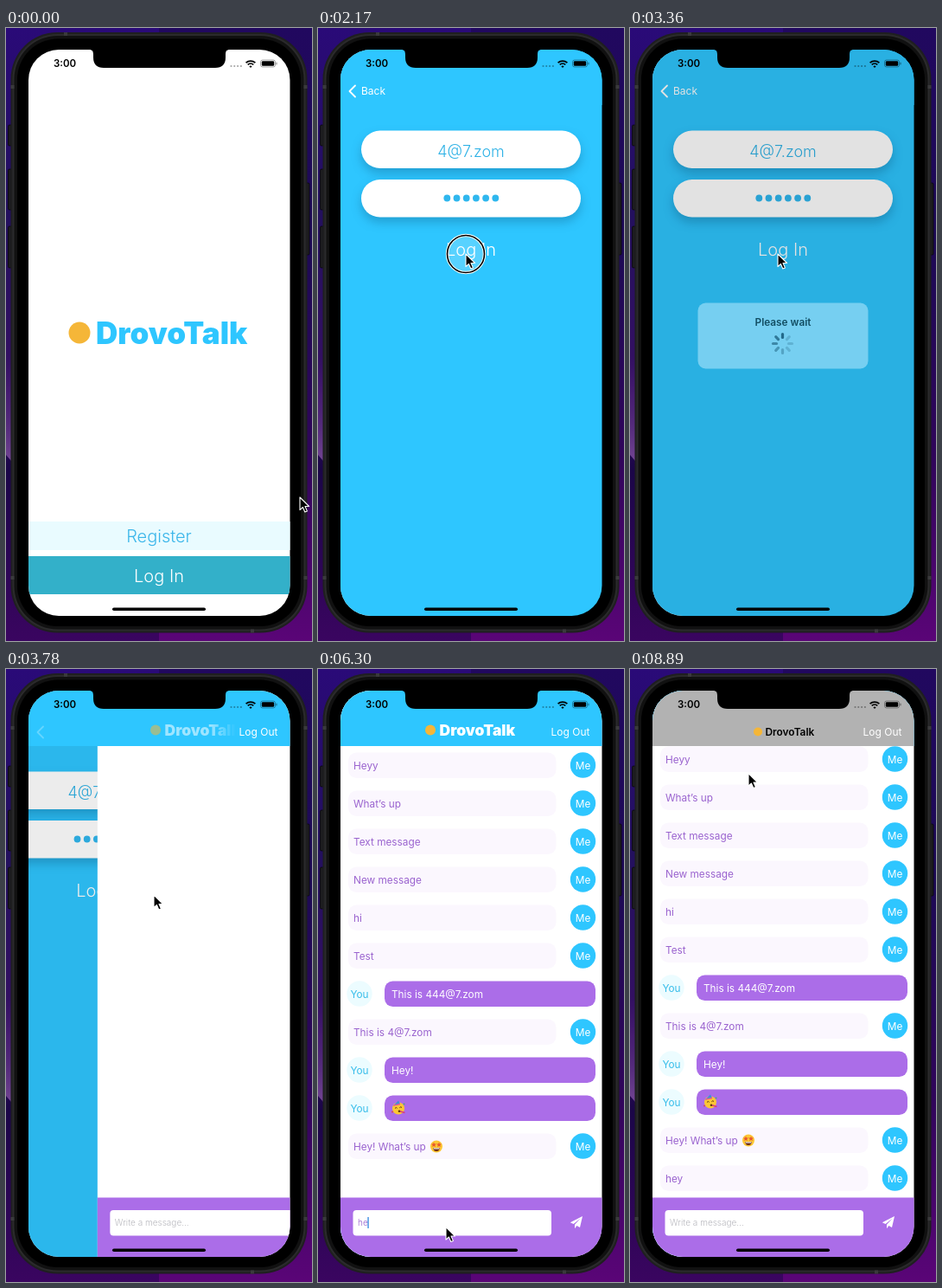
Write an HTML page that moves like this. It is 354x708 px and loops after 9100 ms.

```html
<!DOCTYPE html>
<html lang="en">
<head>
<meta charset="utf-8">
<title>Chat app demo</title>
<style>
  html, body { margin: 0; width: 100%; height: 100%; overflow: hidden; background: #16073f; }
  svg { display: block; width: 100vw; height: 100vh; font-family: Inter, Roboto, sans-serif; }
  .mid { text-anchor: middle; }
  .card { filter: drop-shadow(0 6px 6px rgba(0, 50, 85, .26)); }
</style>
</head>
<body>
<svg viewBox="0 0 354 708" xmlns="http://www.w3.org/2000/svg">
  <defs>
    <linearGradient id="wall" x1="0" y1="0" x2="0" y2="1">
      <stop offset="0" stop-color="#2a0a78"/>
      <stop offset=".3" stop-color="#23105e"/>
      <stop offset=".6" stop-color="#371063"/>
      <stop offset=".72" stop-color="#1b0648"/>
      <stop offset="1" stop-color="#3a0560"/>
    </linearGradient>
    <linearGradient id="wallRight" x1="0" y1="0" x2="0" y2="1">
      <stop offset="0" stop-color="#21085f"/>
      <stop offset=".35" stop-color="#1d0a55"/>
      <stop offset=".7" stop-color="#30055a"/>
      <stop offset="1" stop-color="#5a0577"/>
    </linearGradient>
    <linearGradient id="glow" x1="0" y1="0" x2="0" y2="1">
      <stop offset="0" stop-color="#5a2a88" stop-opacity="0"/>
      <stop offset="1" stop-color="#7a4a98"/>
    </linearGradient>
    <linearGradient id="edgeFade" gradientUnits="userSpaceOnUse" x1="236" y1="0" x2="266" y2="0">
      <stop offset="0" stop-color="#fff"/>
      <stop offset="1" stop-color="#000"/>
    </linearGradient>
    <mask id="titleMask" maskUnits="userSpaceOnUse" x="26" y="25" width="303" height="64">
      <rect x="26" y="25" width="303" height="64" fill="url(#edgeFade)"/>
    </mask>
    <clipPath id="screen"><rect x="26" y="25" width="302.5" height="654" rx="35"/></clipPath>
    <clipPath id="tableClip"><rect x="26" y="89" width="303" height="521"/></clipPath>
  </defs>

  <rect width="354" height="708" fill="url(#wall)"/>
  <rect x="177" width="177" height="708" fill="url(#wallRight)"/>
  <path d="M0 380H12V507L0 493Z" fill="url(#glow)"/>

  <g fill="#1d1d1f" stroke="#000" stroke-width=".6">
    <rect x="2.5" y="112" width="6" height="24" rx="1.5"/>
    <rect x="2.5" y="163" width="6" height="47" rx="1.5"/>
    <rect x="2.5" y="229" width="6" height="48" rx="1.5"/>
    <rect x="345" y="179" width="6" height="83" rx="1.5"/>
  </g>
  <rect x="5.5" y="5" width="343" height="693.5" rx="54" fill="#1f1f20"/>
  <rect x="7.5" y="7" width="339" height="689.5" rx="52" fill="#2b2b2c"/>
  <rect x="9.5" y="9" width="335" height="685.5" rx="50" fill="#111"/>
  <rect x="13" y="12.5" width="328" height="678.5" rx="47" fill="#000"/>
  <g fill="#3a3a3c">
    <rect x="5.5" y="66" width="4" height="4"/><rect x="344.5" y="66" width="4" height="4"/>
    <rect x="5.5" y="633" width="4" height="4"/><rect x="344.5" y="633" width="4" height="4"/>
    <rect x="67" y="5" width="4" height="4"/><rect x="283" y="694.5" width="4" height="4"/>
  </g>

  <g clip-path="url(#screen)">
    <g id="welcome">
      <rect x="26" y="25" width="303" height="654" fill="#fff"/>
      <circle cx="85" cy="352" r="12.5" fill="#f5b638"/>
      <text x="104" y="365" font-size="35" font-weight="900" fill="#2ec6ff">DrovoTalk</text>
      <rect x="26" y="570" width="303" height="33" fill="#e9fbff"/>
      <text class="mid" x="177" y="594" font-size="20" font-weight="300" fill="#3bb6ea">Register</text>
      <rect x="26" y="610" width="303" height="44" fill="#33b0c9"/>
      <text class="mid" x="177" y="640" font-size="20" font-weight="300" fill="#fff">Log In</text>
    </g>
    <rect id="welcomeDim" x="26" y="25" width="303" height="654"/>

    <g id="login">
      <rect x="26" y="25" width="303" height="654" fill="#2ec6ff"/>
      <rect class="card" x="50" y="118.5" width="254" height="43.5" rx="21.7" fill="#fff"/>
      <rect class="card" x="50" y="175" width="254" height="43.5" rx="21.7" fill="#fff"/>
      <text class="mid" x="177" y="149" font-size="18" font-weight="300" fill="#2fb2e6">4@7.zom</text>
      <g id="secret" fill="#2fb7ee"></g>
      <text class="mid" x="177" y="263" font-size="20" font-weight="300" fill="#fff">Log In</text>
    </g>
    <rect id="loginDim" x="26" y="25" width="303" height="654"/>

    <g id="chat">
      <rect x="26" y="25" width="303" height="654" fill="#fff"/>
      <g clip-path="url(#tableClip)"><g id="rows" font-size="11.8" font-weight="400"></g></g>
      <rect x="26" y="610.5" width="303" height="69" fill="#ab6de8"/>
      <rect x="40.5" y="625" width="229.5" height="29.5" rx="4" fill="#fff"/>
      <text id="field" x="46" y="643" font-size="10" font-weight="300"></text>
      <rect id="caret" y="633" width="1.3" height="13" fill="#2f86e0"/>
      <path d="M306 632 291.8 639.2 295.6 641 303.6 634.6 297 641.8V646.2L299.4 643 303 645Z" fill="#fff"/>
    </g>

    <g id="nav">
      <rect x="26" y="25" width="303" height="64" fill="#2ec6ff"/>
      <rect id="navGray" x="26" y="25" width="303" height="64" fill="#b2b2b2"/>
      <path id="chevron" d="M43 66.5 36.5 73 43 79.5" fill="none" stroke="#fff" stroke-width="1.8" stroke-linecap="round" stroke-linejoin="round"/>
      <text id="back" x="50" y="77" font-size="12" fill="#fff">Back</text>
      <g mask="url(#titleMask)">
        <g id="title">
          <circle cx="130" cy="70.5" r="6" fill="#f5b638"/>
          <text x="140.5" y="77" font-size="17.5" font-weight="900" fill="#fff">DrovoTalk</text>
        </g>
      </g>
      <g id="smallTitle">
        <circle cx="148" cy="72.5" r="5" fill="#f5b638"/>
        <text x="156.5" y="77" font-size="11.9" font-weight="600">DrovoTalk</text>
      </g>
      <text id="logout" x="269.5" y="77" font-size="12" fill="#fff">Log Out</text>
    </g>

    <text x="55" y="45" font-size="11.5" font-weight="600">3:00</text>
    <g fill="#000" fill-opacity=".35">
      <circle cx="260.5" cy="44" r="1.1"/><circle cx="264.3" cy="44" r="1.1"/>
      <circle cx="268.1" cy="44" r="1.1"/><circle cx="271.9" cy="44" r="1.1"/>
    </g>
    <g fill="none" stroke="#000" stroke-width="1.7">
      <path d="M277.6 40.2A7.8 7.8 0 0 1 288.4 40.2M279.7 42.4A4.8 4.8 0 0 1 286.3 42.4"/>
      <path d="M283 46 281.4 44.3A2.3 2.3 0 0 1 284.6 44.3Z" fill="#000" stroke="none"/>
      <rect x="294.5" y="37" width="17" height="8" rx="2.3" stroke-width=".8" stroke-opacity=".45"/>
      <rect x="295.8" y="38.2" width="14.4" height="5.6" rx="1.3" fill="#000" stroke="none"/>
      <path d="M313 39.7V42.4" stroke-width="1" stroke-opacity=".5"/>
    </g>

    <rect id="alertDim" x="26" y="25" width="303" height="654"/>
    <g id="alert">
      <rect x="78.5" y="317.5" width="197" height="76" rx="9" fill="#b3e8fd"/>
      <text class="mid" x="177" y="344" font-size="11.8" font-weight="600">Please wait</text>
      <g id="spinner" stroke="#123" stroke-width="3.2" stroke-linecap="round"></g>
    </g>
    <path d="M96 25C100 25 101 27 101 31V34Q101 46 113 46H242Q254 46 254 34V31C254 27 255 25 259 25V20H96Z"/>
    <rect x="123" y="669.5" width="108" height="3.6" rx="1.8"/>
  </g>

  <g id="ring">
    <circle r="21.5" fill="#fff" fill-opacity=".2" stroke="#fff" stroke-width="3.4"/>
    <circle r="21.5" fill="none" stroke="#000" stroke-width="1.6"/>
  </g>
  <path id="cursor" d="M0 0V14.6L3.4 11.5 5.8 17 8.4 15.9 6 10.5H10.6Z" fill="#000" stroke="#fff" stroke-width="1.1" stroke-linejoin="round"/>
</svg>

<script>
const LOOP = 9100, WIDTH = 302.5;
const ui = {};
document.querySelectorAll('svg [id]').forEach(el => { ui[el.id] = el; });

const clamp = v => Math.min(1, Math.max(0, v));
const ramp = (t, a, b) => clamp((t - a) / (b - a));
const smooth = k => k * k * (3 - 2 * k);
const fade = (el, v) => el.setAttribute('opacity', v);
const move = (el, x, y = 0) => el.setAttribute('transform', `translate(${x} ${y})`);

// Critically damped spring used by page pushes
function push(t, start) {
  const s = Math.max(0, t - start) * 0.014;
  return s > 11 ? 1 : 1 - (1 + s) * Math.exp(-s);
}

const star = (x, y) => `<path transform="translate(${x} ${y})" fill="#e8552d"
  d="M0-3 .8-1 3-.9 1.3.5 1.9 2.6 0 1.4-1.9 2.6-1.3.5-3-.9-.8-1Z"/>`;
const face = '<circle r="7" fill="#fcc734"/>';
const emoji = {
  party: face + `<path d="M-6-3 0-9 2-5Z" fill="#3d8fd8"/><path d="M-5.6-3.4 2-5" stroke="#e5559a" stroke-width="1.3"/>
    <path d="M-4 0Q-2.7-2-1.4-.2M1.4-.8Q2.8-2.6 4-1" fill="none" stroke="#5b3510"/>
    <circle cx="1" cy="3.2" r="1.3" fill="#5b3510"/><path d="M2 3.4 7.5 5" stroke="#d8407a" stroke-width="1.7"/>
    <circle cx="6.5" cy="-5" r="1" fill="#4bb36b"/><circle cx="-7" cy="4" r="1" fill="#d84a4a"/>`,
  stars: face + star(-3, -2) + star(3, -2) + '<path d="M-4 1.5H4Q3.5 5.6 0 5.6T-4 1.5Z" fill="#6b2b18"/><path d="M-3.5 1.8H3.5V3H-3.5Z" fill="#fff"/>'
};

const messages = [
  ['Me', 'Heyy'], ['Me', 'What’s up'], ['Me', 'Text message'], ['Me', 'New message'],
  ['Me', 'hi'], ['Me', 'Test'], ['You', 'This is 444@7.zom'], ['Me', 'This is 4@7.zom'],
  ['You', 'Hey!'], ['You', '', 'party', 93], ['Me', 'Hey! What’s up', 'stars', 137], ['Me', 'hey']
];

function row([who, text, icon, iconX], i) {
  const me = who === 'Me', cx = me ? 306.5 : 48;
  const pic = icon ? `<g transform="translate(${iconX} .5)">${emoji[icon]}</g>` : '';
  return `<g transform="translate(0 ${111 + 44 * i})">
    <rect x="${me ? 35 : 77}" y="-14.5" width="${me ? 240.5 : 244}" height="29.5" rx="9.5" fill="${me ? '#fbf7fe' : '#ab6de8'}"/>
    <text x="${me ? 41 : 85}" y="4.5" fill="${me ? '#9a63cf' : '#fff'}">${text}</text>${pic}
    <circle cx="${cx}" r="14.7" fill="${me ? '#2ec6ff' : '#ecfcff'}"/>
    <text class="mid" x="${cx}" y="4.5" fill="${me ? '#fff' : '#38bdea'}">${who}</text></g>`;
}
ui.rows.innerHTML = messages.map(row).join('');
const sentRow = ui.rows.lastElementChild;

ui.secret.innerHTML = Array.from({ length: 6 }, (_, i) =>
  `<circle cx="${149.3 + 11.2 * i}" cy="196.5" r="3.9"/>`).join('');
ui.spinner.innerHTML = Array.from({ length: 8 }, (_, i) =>
  `<path d="M176.5 357.5V353.5" transform="rotate(${45 * i} 176.5 364.5)"/>`).join('');

// time, x, y
const path = [
  [0, 340, 542], [70, 340, 542], [700, 187, 639], [1330, 187, 639], [2000, 171, 261],
  [3850, 171, 261], [4480, 148, 644.5], [6790, 148, 644.5], [7630, 289, 637],
  [8470, 289, 637], [8890, 137, 120.5], [LOOP, 137, 120.5]
];
const clicks = [740, 2170, 4690, 7770];
const edits = [[4830, ''], [5950, 'h'], [6230, 'he'], [6580, 'hey'], [8190, '']];
const caretX = [45.5, 51.8, 57.4, 62.4];

function pointer(t) {
  const i = path.findIndex(p => p[0] > t);
  const a = path[i - 1], b = path[i], k = smooth(ramp(t, a[0], b[0]));
  return [a[1] + (b[1] - a[1]) * k, a[2] + (b[2] - a[2]) * k];
}

function drawPages(t) {
  const p1 = push(t, 820), p2 = push(t, 3594);
  move(ui.welcome, -0.3 * WIDTH * p1);
  move(ui.login, WIDTH * (1 - p1) - 0.3 * WIDTH * p2);
  move(ui.chat, WIDTH * (1 - p2));
  fade(ui.welcomeDim, 0.1 * p1);
  fade(ui.loginDim, 0.1 * p2);

  fade(ui.nav, t >= 820 ? 1 : 0);
  fade(ui.chevron, clamp(p1 * 1.15) * (1 - p2));
  fade(ui.back, clamp(p1 * 1.15) * clamp(1 - 2.5 * p2));
  const gray = ramp(t, 7840, 7980);
  move(ui.title, 163 * (1 - p2));
  fade(ui.title, p2 * p2 * (1 - gray));
  fade(ui.navGray, gray);
  fade(ui.smallTitle, gray);
  fade(ui.logout, clamp(p2 * 1.4));
}

function drawAlert(t) {
  const shown = smooth(ramp(t, 2300, 2500)), on = shown * (1 - smooth(ramp(t, 3260, 3480)));
  const scale = 1.15 - 0.15 * shown;
  fade(ui.alertDim, 0.2 * on);
  fade(ui.alert, on);
  ui.alert.setAttribute('transform', `translate(177 355.5) scale(${scale}) translate(-177 -355.5)`);
  const lead = (Math.floor(t / 125) + 6) % 8;
  [...ui.spinner.children].forEach((el, i) =>
    fade(el, Math.max(0.25, 0.9 - 0.13 * ((lead - i + 8) % 8))));
}

function drawChat(t) {
  fade(ui.rows, t >= 4130 ? 1 : 0);
  fade(sentRow, t >= 7840 ? 1 : 0);
  move(ui.rows, 0, -7 * smooth(ramp(t, 7840, 8050)));

  const edit = edits.filter(e => e[0] <= t).pop();
  const text = edit ? edit[1] : '';
  ui.field.textContent = text || 'Write a message...';
  ui.field.setAttribute('fill', text ? '#9a63cf' : '#b9b9bf');
  ui.caret.setAttribute('x', caretX[text.length]);
  fade(ui.caret, edit && (t - edit[0]) % 1000 < 500 ? 1 : 0);
}

function drawPointer(t) {
  const [x, y] = pointer(t);
  move(ui.cursor, x, y);
  move(ui.ring, x, y);
  fade(ui.ring, clicks.some(c => t >= c && t < c + 140) ? 1 : 0);
}

function render(t) {
  drawPages(t);
  drawAlert(t);
  drawChat(t);
  drawPointer(t);
}

const start = performance.now();
function tick() {
  render((performance.now() - start) % LOOP);
  requestAnimationFrame(tick);
}
tick();
</script>
</body>
</html>
```
